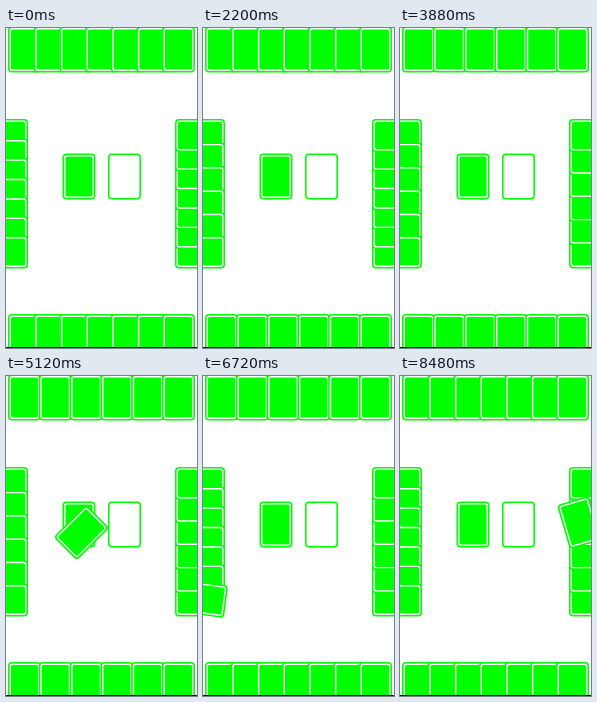
Animation, 191 px wide and 320 px high, one loop 8.52 s. Source, as an HTML page with a canvas:

```html
<!DOCTYPE html>
<html lang="en">
<head>
<meta charset="utf-8">
<title>Card table</title>
<style>
  html, body { margin: 0; width: 100%; height: 100%; overflow: hidden; background: #fff; }
  canvas { display: block; width: 100vw; height: 100vh; }
</style>
</head>
<body>
<canvas id="table"></canvas>
<script>
const WIDTH = 191, HEIGHT = 320, LOOP = 8520, TICK = 40;
const GREEN = '#00ff00';
const CARD_W = 33, CARD_H = 46;
const DECK = { x: 73, y: 148.5 }, PILE = { x: 118.5, y: 148.5 };
const PLAY_MS = 350, DRAW_MS = 1000, LAND_MS = 845, MAKE_ROOM_MS = 400;

// from/to: centres of the first and last card; seat: where played cards come from
const hands = [
  { from: [18.5, 309], to: [172.5, 309], angle: 0, seat: [95.5, 329],
    play: 830, draw: 5112.6, slot: 4, spin: 900 },
  { from: [-1, 107.5], to: [-1, 224], angle: 90, seat: [-85, 148.5],
    play: 1830, draw: 6130, slot: 6, spin: -450 },
  { from: [18.5, 21.5], to: [172.5, 21.5], angle: 0, seat: [95.5, -31],
    play: 2830, draw: 7130, slot: 6, spin: 0 },
  { from: [192, 107.5], to: [192, 224], angle: 90, seat: [276, 148.5],
    play: 3850, draw: 8158, slot: 2, spin: 990, firstOnTop: true }
];

const canvas = document.getElementById('table');
const ctx = canvas.getContext('2d');

const mix = (a, b, p) => a + (b - a) * p;
const easeOutExpo = p => 1 - 2 ** (-10 * p);

function panel(inset, radius, color) {
  ctx.fillStyle = color;
  ctx.beginPath();
  ctx.roundRect(inset - CARD_W / 2, inset - CARD_H / 2,
    CARD_W - 2 * inset, CARD_H - 2 * inset, radius);
  ctx.fill();
}

function card(x, y, angle, faceUp = false) {
  ctx.save();
  ctx.translate(x, y);
  ctx.rotate(angle * Math.PI / 180);
  panel(0, 4, GREEN);
  panel(1.6, 2.6, '#fff');
  if (!faceUp) panel(3, 1.5, GREEN);
  ctx.restore();
}

function slotCentre(hand, index, count) {
  const p = index / (count - 1);
  return [mix(hand.from[0], hand.to[0], p), mix(hand.from[1], hand.to[1], p)];
}

function drawHand(hand, t) {
  const sinceDraw = t - hand.draw;
  const full = t < hand.play || sinceDraw >= MAKE_ROOM_MS;
  const count = full ? 7 : 6;
  const gap = full && sinceDraw >= 0 && sinceDraw < LAND_MS ? hand.slot : -1;
  for (let i = 0; i < count; i++) {
    const index = hand.firstOnTop ? count - 1 - i : i;
    if (index !== gap) card(...slotCentre(hand, index, count), hand.angle);
  }
}

function drawFlight(hand, t) {
  const played = (t - hand.play) / PLAY_MS;
  if (played >= 0 && played < 1) {
    card(mix(hand.seat[0], PILE.x, played), mix(hand.seat[1], PILE.y, played),
      hand.angle * (1 - played), true);
  }
  const sinceDraw = t - hand.draw;
  if (sinceDraw >= 0 && sinceDraw < LAND_MS) {
    const p = easeOutExpo(sinceDraw / DRAW_MS);
    const [x, y] = slotCentre(hand, hand.slot, 7);
    card(mix(DECK.x, x, p), mix(DECK.y, y, p), hand.spin * p);
  }
}

function render(now) {
  const t = Math.floor(now % LOOP / TICK) * TICK;
  const ratio = window.devicePixelRatio || 1;
  const w = Math.round(innerWidth * ratio), h = Math.round(innerHeight * ratio);
  if (canvas.width !== w || canvas.height !== h) {
    canvas.width = w;
    canvas.height = h;
  }
  ctx.setTransform(w / WIDTH, 0, 0, h / HEIGHT, 0, 0);
  ctx.fillStyle = '#fff';
  ctx.fillRect(0, 0, WIDTH, HEIGHT);
  card(DECK.x, DECK.y, 0);
  card(PILE.x, PILE.y, 0, true);
  hands.forEach(hand => drawHand(hand, t));
  hands.forEach(hand => drawFlight(hand, t));
  ctx.fillStyle = '#111';
  ctx.fillRect(0, HEIGHT - 1, WIDTH, 1);
}

const start = performance.now();
function loop() {
  render(performance.now() - start);
  requestAnimationFrame(loop);
}
loop();
</script>
</body>
</html>
```
